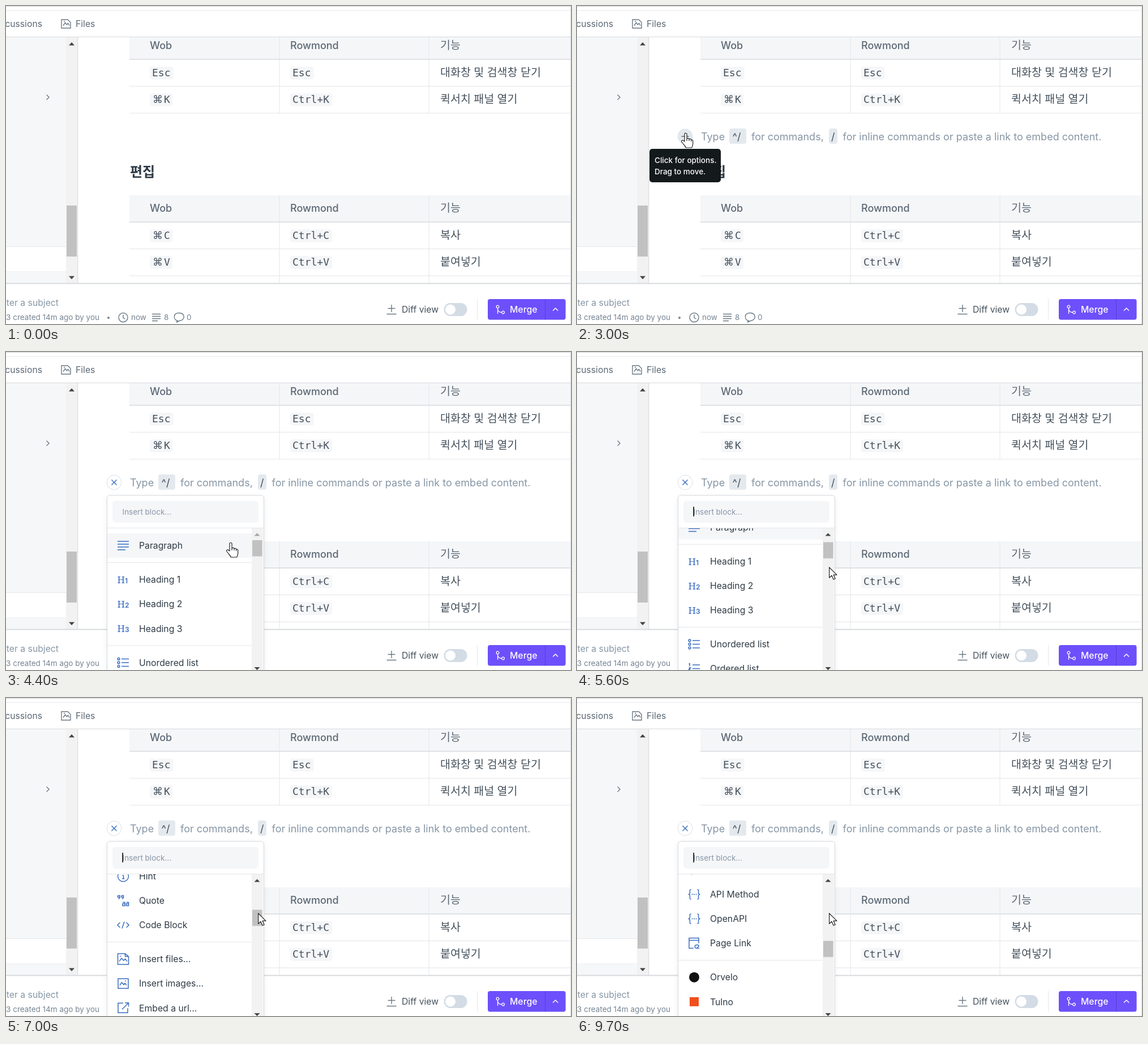
Write an HTML page that moves like this. It is 998 px wide and 561 px high and loops after 9.9 s.

```html
<!DOCTYPE html>
<html lang="ko">
<head>
<meta charset="utf-8">
<title>Insert block menu</title>
<style>
html, body { margin: 0; width: 100%; height: 100%; overflow: hidden; background: #fff; }
svg { display: block; width: 100vw; height: 100vh; font-family: Inter, "Noto Sans CJK KR", "Noto Sans CJK", sans-serif; }
text { white-space: pre; }
.ko { font-family: "Noto Sans CJK KR", "Noto Sans CJK", sans-serif; }
.code { font-family: "DejaVu Sans Mono", monospace; }
.key { font-family: "DejaVu Sans", sans-serif; }
.serif { font-family: "Noto Serif", serif; }
.icon { fill: none; stroke: #3a6dc0; stroke-width: 1.5; }
.icon text { fill: #3a6dc0; stroke: none; }
.gray { fill: none; stroke: #6a7885; stroke-width: 1.4; }
#plus { transform-origin: 191px 230px; }
</style>
</head>
<body>
<svg id="stage" viewBox="0 0 998 561"></svg>
<script>
const LOOP = 9900, STEP = 100;
const SLATE = '#5c6975', INK = '#45515c', PALE = '#f5f6f8', LINE = '#e3e6ea', MUTED = '#8796a5', BLUE = '#3a6dc0';

const rect = (x, y, w, h, fill, rx = 0, more = '') =>
  `<rect x="${x}" y="${y}" width="${w}" height="${h}" fill="${fill}" rx="${rx}" ${more}/>`;
const text = (x, y, str, size, fill, more = '') =>
  `<text x="${x}" y="${y}" font-size="${size}" fill="${fill}" ${more}>${str}</text>`;
const path = (d, more = '') => `<path d="${d}" ${more}/>`;
const at = (x, y, body, more = '') => `<g transform="translate(${x} ${y})" ${more}>${body}</g>`;
const MEDIUM = 'font-weight="500"', END = 'text-anchor="end"', KO = 'class="ko"';

// ---- Document ----
const COLS = [254, 502, 767];

function code(x, y, label) {
  const symbol = label[0] === '⌘';
  const width = symbol ? 40 : label.length * 10.84 + 9;
  return rect(x, y - 17, width, 22.5, PALE, 4) + (symbol
    ? text(x + 5, y, '⌘', 18, INK, 'class="key"') + text(x + 25, y, label.slice(1), 18, INK, 'class="code"')
    : text(x + 4, y, label, 18, INK, 'class="code"'));
}

function table(top, bottom, rows) {
  const head = top + 46;
  let out = rect(218, top, 780, 46, PALE);
  [483, 747].forEach(x => out += rect(x - .5, top, 1, bottom - top, LINE));
  out += rect(218, head, 780, 2, '#dfe2e6');
  out += text(COLS[0], top + 29, 'Wob', 18, SLATE, MEDIUM) + text(COLS[1], top + 29, 'Rowmond', 18, SLATE, MEDIUM)
       + text(COLS[2], top + 28.5, '기능', 19.5, SLATE, KO);
  rows.forEach(([a, b, c], i) => {
    const y = head + 31 + i * 47.3;
    out += code(COLS[0], y, a) + code(COLS[1], y, b) + text(COLS[2], y - .5, c, 19.5, INK, KO);
    out += rect(218, head + 48 + i * 47.5, 780, 1, LINE);
  });
  return out;
}

const doc = table(47, 189, [['Esc', 'Esc', '대화창 및 검색창 닫기'], ['⌘K', 'Ctrl+K', '퀵서치 패널 열기']])
  + text(219, 301, '편집', 24, '#2f3a44', 'class="ko" font-weight="700"')
  + table(334, 489, [['⌘C', 'Ctrl+C', '복사'], ['⌘V', 'Ctrl+V', '붙여넣기']]);

const hint = '<g id="hint">'
  + rect(269, 216, 30, 27, '#e4e9ee', 4) + rect(445, 216, 15, 27, '#e4e9ee', 4)
  + text(219, 236.5, 'Type', 18, MUTED) + text(274.5, 236.5, '^/', 18, INK)
  + text(308, 236.5, 'for commands,', 18, MUTED) + text(449, 236.5, '/', 18, INK)
  + text(469.5, 236.5, 'for inline commands or paste a link to embed content.', 18, MUTED) + '</g>';

// ---- Page frame ----
const picture = 'M-8-7.5h11l5 5v10h-16zM-5 3l3.5-5 3 3.5 2-2.5 2.5 4M-4-4.5h2';
const sidebar = rect(0, 55, 106, 435, '#f6f7f9') + rect(0, 424, 106, 45, LINE) + rect(0, 425, 106, 43.5, '#fff')
  + rect(106, 55, 20, 435, '#f2f2f2') + rect(107, 352, 18, 90, '#c1c1c1') + rect(126, 55, 1.2, 435, '#d9dce0')
  + path('M111 69.5l5-5.5 5 5.5zM111 476.5l5 5.5 5-5.5z', 'fill="#444"')
  + path('M71.5 156.5l4.5 4.5-4.5 4.5', 'class="gray"');

const toolbar = rect(0, 0, 998, 55, '#fff') + rect(0, 0, 998, 1, '#d3d3d5') + rect(0, 7.5, 998, 1, '#e6e8ea')
  + rect(0, 54, 998, 1, '#d6dade')
  + text(64, 37, 'Discussions', 15.75, SLATE, END) + text(123, 37, 'Files', 15.75, SLATE)
  + at(106, 31.5, path(picture), 'class="gray"');

const META = '#768492';
const footer = rect(0, 489, 998, 72, '#fff') + rect(0, 488.5, 998, 2, '#d8dbdf')
  + text(93, 528.5, 'Enter a subject', 15.75, MUTED, END)
  + text(165, 554, '#3 created 14m ago by you', 13.5, META, END) + `<circle cx="181" cy="550" r="2" fill="${META}"/>`
  + at(207, 549.5, '<circle r="8"/>' + path('M0-5v5.5l3.5 2'), 'class="gray"') + text(221, 554, 'now', 13.5, META)
  + path('M258 543.5h15M258 547.5h15M258 551.5h15M258 555.5h10', 'class="gray"') + text(279, 554, '8', 13.5, META)
  + path('M303 555.5C295 553 295 541.5 306 541.5S317 555 306 555.5L301 558z', 'class="gray"') + text(319, 554, '0', 13.5, META)
  + path('M681 527v13M674.5 533.5h13M672.5 543.5h17', 'class="gray"') + text(699, 541, 'Diff view', 15.75, INK)
  + rect(773.5, 524, 41, 23, '#d3dce5', 11.5) + '<circle cx="785" cy="535.5" r="9" fill="#fff"/>'
  + rect(832, 517, 1, 36, LINE)
  + rect(851, 517, 137.5, 36.5, '#6d50fb', 4) + rect(952, 517, 1, 36.5, '#5540d8')
  + at(873, 535.5, '<circle cx="-4.5" cy="-5" r="2.3"/><circle cx="5" cy="5" r="2.3"/>' + path('M-4.5-2.5v10M-4.5-1C-4 3-1 5 2.5 5'),
       'fill="none" stroke="#fff" stroke-width="1.3"')
  + text(890, 541, 'Merge', 15.75, '#fff', MEDIUM)
  + path('M966 537.5l4.5-4.5 4.5 4.5', 'fill="none" stroke="#fff" stroke-width="1.5"')
  + rect(997, 0, 1, 561, '#dcdde0');

// ---- Insert menu ----
const heading = n => text(-10.5, 6.5, 'H', 17, BLUE, 'class="serif"') + text(3, 6.5, n, 12, BLUE, 'font-weight="600"');
const bullets = 'M-3-6.5H10M-3 0H10M-3 6.5H10';
const braces = path('M-5.5-8.5c-3 0-2 2-2 5.5 0 2-2 3-2 3s2 1 2 3c0 3.5-1 5.5 2 5.5M5.5-8.5c3 0 2 2 2 5.5 0 2 2 3 2 3s-2 1-2 3c0 3.5 1 5.5-2 5.5M-4.5 0h2M-1 0h2M2.5 0h2');
const quotes = 'M-9.5-9h3.5v3.5l-2 3M-9.5-9v3h3.5M-3-9h3.5v3.5l-2 3M-3-9v3h3.5M-1 3h4v6h-4v-3.5h4M5.5 3h4v6h-4v-3.5h4';
const SECTIONS = [
  [['Paragraph', path('M-10-7.5h20M-10-2.5h20M-10 2.5h20M-10 7.5h14')]],
  [1, 2, 3].map(n => ['Heading ' + n, heading(n)]),
  [['Unordered list', [-6.5, 0, 6.5].map(y => `<circle cx="-8" cy="${y}" r="1.9"/>`).join('') + path(bullets)],
   ['Ordered list', path(bullets + 'M-9.5-8l1.5-1v5M-9.5-1.5h3l-3 3h3M-9.5 5h3v4h-3')],
   ['Task list', path(bullets + 'M-10-6.5l1.5 1.5 3-3M-10 0l1.5 1.5 3-3M-10 6.5l1.5 1.5 3-3')]],
  [['Hint', '<circle r="9.5"/>' + path('M-1.5-1H.5v5.5M-2 4.5h4.5M-.5-5h1.5')],
   ['Quote', path(quotes)],
   ['Code Block', path('M-5.5-4.5l-4.5 4.5 4.5 4.5M5.5-4.5l4.5 4.5-4.5 4.5M2-6l-4 12')]],
  [['Insert files...', path('M-9.5-9.5h13l6 5v14h-19zM-7 4l4-5.5 4 4 2.5-3 3.5 4.5M-5.5-5h2M3.5-9v4.5h6')],
   ['Insert images...', path('M-9-8.5h18v17h-18zM-6 3l3.5-5 3.5 4 2-2.5 3 3.5M3-4.5h2')],
   ['Embed a url...', path('M0-8.5h-9v17h17v-8M3-9h6.5v6.5M9-8.5l-11 11')],
   ['Table', path('M-9.5-8.5h19v17h-19zM-9.5-3h19M-9.5 3h19M-3-8.5v17M3-8.5v17')],
   ['Cards', path('M-9.5-9h19v18h-19zM-6.5-3.5h3v7h-3zM-1.5-3.5h3v7h-3zM3.5-3.5h3v7h-3z')],
   ['Tabs', path('M-9.5 5v-9h8l2 4h9v5zM2-4h5l2.5 4')],
   ['Expandable', path('M-5-8.5h14.5v17h-14.5V3M-10-6l3.5 3-3.5 3M-2-4.5h8M-2 0h8M-2 4.5h5')],
   ['Drawing', path('M-5 5l1-4 9-9 3.5 3.5-9 9zM3-6l3.5 3.5M-4-4c-6 0-7 6-3 7M2 7c3 0 5-1 7-4')],
   ['Math &amp; TeX', path('M-10 1h2.5l3 6 3.5-14h10.5M1-2l7 9M8-2l-7 9')],
   ['API Method', braces], ['OpenAPI', braces],
   ['Page Link', path('M-1 9h-8v-18h17v9M-9-5h17M9 9h-4c-5 0-5-6 0-6s3 5 0 4')]],
  [['Orvelo', '<circle r="9" fill="#111" stroke="none"/>'],
   ['Tulno', rect(-8, -8, 16, 16, '#f24e1e', 0, 'stroke="none"')]]
];
const ROW = 43.1, GAP = 17;

function menuRows() {
  let y = 341.5, out = rect(179, 320, 255, 43, PALE);
  SECTIONS.forEach((items, i) => {
    if (i) {
      out += rect(179, y - ROW / 2 + GAP / 2 - .5, 255, 1, LINE);
      y += GAP;
    }
    for (const [label, icon] of items) {
      out += at(207, y, icon, 'class="icon"') + text(235, y + 5.7, label, 15.75, '#2f3a45');
      y += ROW;
    }
  });
  return out;
}

const menu = '<g id="menu">'
  + rect(178.5, 253, 277, 330, '#fff', 5, 'stroke="#d3d8de" style="filter:drop-shadow(0 2px 4px #0001)"')
  + rect(188, 262.5, 258, 38.5, PALE, 6) + text(205.5, 287, 'Insert block...', 13.5, MUTED)
  + rect(205.3, 273, 1.7, 17, '#111', 0, 'id="caret"')
  + rect(179, 310, 276, 1, LINE)
  + `<g clip-path="url(#list)"><g id="rows">${menuRows()}</g></g>`
  + rect(434, 311, 20, 250, '#f2f2f2') + rect(435, 332, 17.5, 28.5, '#c1c1c1', 0, 'id="thumb"')
  + path('M438.5 324.5l5-5 5 5z', 'id="up"') + path('M438.5 556l5 5 5-5z', 'fill="#444"') + '</g>';

const button = '<g id="button"><circle id="disc" cx="191" cy="230" r="12.8" stroke="#d9dfe6"/>'
  + path('M184.5 230h13M191 223.5v13', 'id="plus" stroke-width="1.5"') + '</g>';

const tooltip = '<g id="tooltip">' + rect(128, 252, 126, 59, '#14191c', 5)
  + text(137, 277, 'Click for options.', 13.5, '#fff', MEDIUM) + text(137, 297, 'Drag to move.', 13.5, '#fff', MEDIUM) + '</g>';

const cursor = '<g id="cursor" stroke="#222" fill="#fff" stroke-width="1.2" stroke-linejoin="round">'
  + path('M.6.8v18.5l4.3-4 3.2 7 3-1.3-3-6.8h5.8z', 'id="arrow"')
  + path('M-4-10q4 0 4 2q0-2 4-2M0-8v16M-4 10q4 0 4-2q0 2 4 2', 'id="beam" fill="none"')
  + path('M-2 14V1.5q0-2 2-2t2 2V9q3-1.5 4 .8q3-1 3.7 1q3-.3 3 2.2v5q0 3-2 7h-10.5q-1-3-4-6l-3.5-4.5q-.5-3 2.5-2.5zM2 9v4M6 10v3M9.7 11v3', 'id="hand"')
  + '</g>';

const stage = document.getElementById('stage');
stage.innerHTML = '<clipPath id="list"><rect x="179" y="311" width="255" height="250"/></clipPath>'
  + rect(0, 0, 998, 561, '#fff') + doc + hint + sidebar + toolbar + footer + button + menu + tooltip + cursor;

// ---- Motion: every track is a function of time, held for each step ----
function track(id, pose) {
  const frames = [];
  for (let t = 0; t < LOOP; t += STEP) frames.push({ ...pose(t), offset: t / LOOP, easing: 'step-end' });
  frames.push({ ...pose(LOOP - STEP), offset: 1 });
  document.getElementById(id).animate(frames, { duration: LOOP, iterations: Infinity });
}

const clamp = v => Math.max(0, Math.min(1, v));
const shown = on => ({ opacity: on ? 1 : 0 });
const move = (x, y) => ({ transform: `translate(${x}px, ${y}px)` });

const NOTCH = 126, WHEEL = [5500, 6000, 6500, 7000, 7300, 8200, 8200], RAMP = [.015, .257, .78, 1];
const scrolled = t => WHEEL.reduce((sum, start) =>
  sum + (t < start ? 0 : NOTCH * RAMP[Math.min(3, (t - start) / STEP)]), 0);

const ROUTE = [[0, 1012, 510], [100, 990, 499], [500, 690, 365], [800, 400, 250], [1000, 288, 226], [1100, 274, 226],
  [2100, 274, 226], [2400, 192, 225], [3700, 192, 225], [4100, 320, 292], [4400, 397, 337], [4600, 425, 424],
  [4700, 438, 408], [5000, 445, 379]];
function pointer(t) {
  const next = ROUTE.findIndex(p => p[0] > t);
  if (next < 0) return ROUTE.at(-1).slice(1);
  const [a, b] = [ROUTE[next - 1], ROUTE[next]];
  const k = (t - a[0]) / (b[0] - a[0]);
  return [a[1] + (b[1] - a[1]) * k, a[2] + (b[2] - a[2]) * k];
}
const pointerKind = t => t < 200 || t >= 4700 ? 'arrow' : t < 2300 ? 'beam' : 'hand';

track('cursor', t => move(...pointer(t)));
['arrow', 'beam', 'hand'].forEach(kind => track(kind, t => shown(pointerKind(t) === kind)));
track('hint', t => ({ opacity: clamp((t - 1400) / 200) }));
track('button', t => shown(t >= 800));
track('disc', t => ({ fill: t >= 2300 && t < 3700 ? '#e4e9ee' : '#ffffff' }));
track('plus', t => ({
  transform: `rotate(${45 * clamp((t - 3200) / 300)}deg)`,
  stroke: t < 3300 ? SLATE : BLUE
}));
track('tooltip', t => ({ opacity: clamp((t - 2700) / 300) * clamp((3300 - t) / 200) }));
track('menu', t => ({ opacity: clamp((t - 3200) / 200) }));
track('caret', t => shown(t >= 3300 && Math.floor((t - 3300) / 800) % 2 === 0));
track('rows', t => move(0, -scrolled(t)));
track('thumb', t => move(0, scrolled(t) / 9.14));
track('up', t => ({ fill: scrolled(t) ? '#444444' : '#a3a3a3' }));
</script>
</body>
</html>
```
